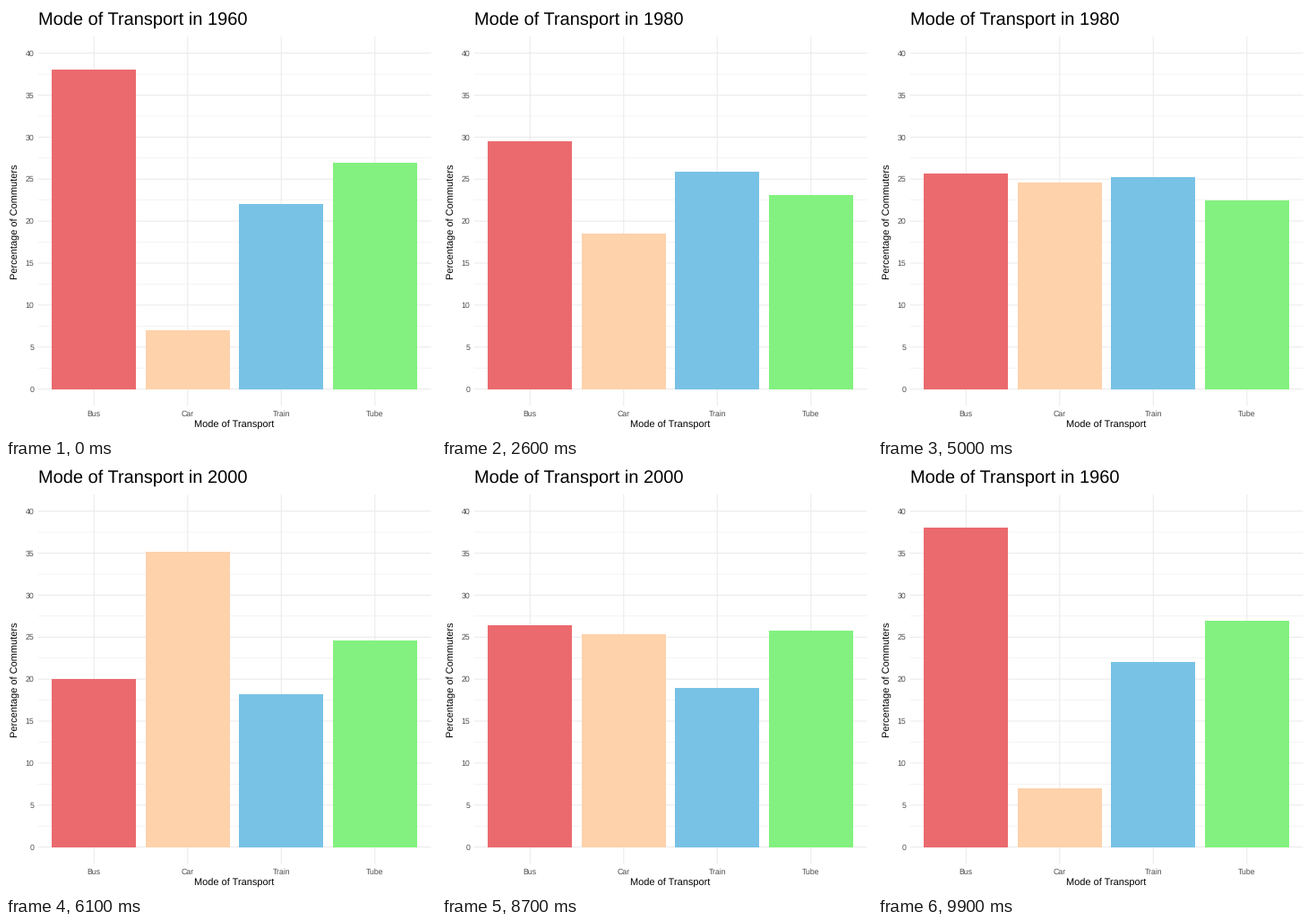
Animation of 480x480 px, one loop 10000 ms. Source, as a matplotlib script:

```python
import math

import matplotlib.pyplot as plt
from matplotlib.animation import FuncAnimation
from matplotlib.patches import Rectangle

SIZE, DPI = 480, 96
FRAMES, INTERVAL = 100, 100

plt.rcParams["font.family"] = "Liberation Sans"
plt.rcParams["text.hinting"] = "none"

MODES = ["Bus", "Car", "Train", "Tube"]
COLORS = ["#EB6A6E", "#FED2AB", "#78C2E5", "#83F17F"]
SHARES = {
    1960: (38, 7, 22, 27),
    1980: (27, 22, 27, 22),
    2000: (19, 37, 17, 25),
}
# first frame, last frame, year before, year after
MOVES = [(11, 33, 1960, 1980), (44, 66, 1980, 2000), (78, 99, 2000, 1960)]
TITLE_DELAY = 12

LEFT, STEP = 35.6, 104.5
ZERO, UNIT = 427.6, 9.374
RIGHT = LEFT + 4.2 * STEP
GRID = "#EBEBEB"


def px(n):
    return n * 72 / DPI


def x_at(pos):
    return LEFT + (pos + 0.6) * STEP


def y_at(value):
    return ZERO - UNIT * value


def snap(v):
    return math.floor(v + 0.5)


fig = plt.figure(figsize=(SIZE / DPI, SIZE / DPI), dpi=DPI, facecolor="white")
ax = fig.add_axes([0, 0, 1, 1])
ax.set_xlim(0, SIZE)
ax.set_ylim(SIZE, 0)
ax.axis("off")


def line(xs, ys, width):
    ax.plot(xs, ys, color=GRID, lw=px(width), solid_capstyle="butt",
            snap=False, zorder=1)


def label(x, y, text, size, color="black", ha="center", rotation=0):
    return ax.text(x, y, text, fontsize=px(size), color=color, ha=ha,
                   va="baseline", rotation=rotation, rotation_mode="anchor")


for i in range(8):
    y = y_at(2.5 + 5 * i)
    line([LEFT, RIGHT], [y, y], 0.53)
for value in range(0, 41, 5):
    y = y_at(value)
    line([LEFT, RIGHT], [y, y], 1.07)
    label(31.2, y + 3.15, str(value), 8.8, "#4D4D4D", ha="right")

bars = []
for i, (mode, color) in enumerate(zip(MODES, COLORS)):
    x = x_at(i)
    line([x, x], [y_at(42), y_at(-2)], 1.07)
    label(x, 458, mode, 8.8, "#4D4D4D")
    x0, x1 = snap(x_at(i - 0.45)), snap(x_at(i + 0.45))
    bar = Rectangle((x0, snap(ZERO)), x1 - x0, 0, facecolor=color,
                    linewidth=0, antialiased=False, zorder=2)
    bars.append(ax.add_patch(bar))

label((LEFT + RIGHT) / 2, 471, "Mode of Transport", 11)
label(13.4, 240.3, "Percentage of Commuters", 11, rotation=90)
title = label(LEFT, 21, "", 20, ha="left")


def state(frame):
    """Shares and title year, eased by a sine between the years."""
    shares, year = SHARES[1960], 1960
    for start, end, before, after in MOVES:
        if frame < start:
            break
        p = min(1, (frame - start) / (end - start))
        k = (1 - math.cos(math.pi * p)) / 2
        shares = [a + (b - a) * k
                  for a, b in zip(SHARES[before], SHARES[after])]
        year = after if frame >= start + TITLE_DELAY else before
    return shares, year


def update(frame):
    shares, year = state(frame)
    for bar, share in zip(bars, shares):
        top = snap(y_at(share))
        bar.set_y(top)
        bar.set_height(snap(ZERO) - top)
    title.set_text(f"Mode of Transport in {year}")
    return [*bars, title]


anim = FuncAnimation(fig, update, frames=FRAMES, interval=INTERVAL,
                     init_func=lambda: update(0), repeat=True,
                     repeat_delay=0, blit=False)
plt.show()
```
